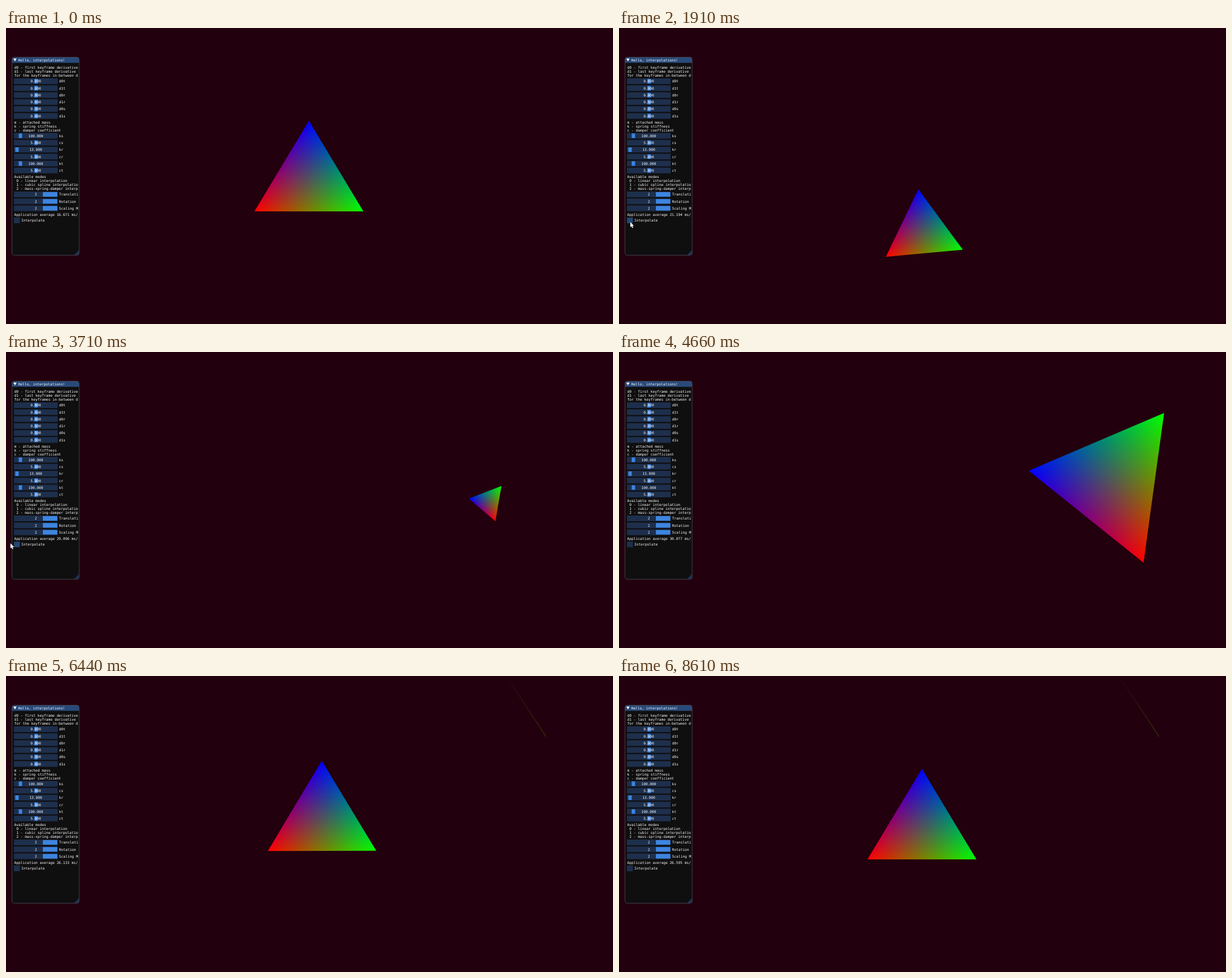
Recreate the animation shown at these times as an HTML page with a canvas. Size 1070 by 523 pixels, loop 8.64 s.

```html
<!DOCTYPE html>
<html lang="en">
<head>
<meta charset="utf-8">
<title>Interpolations</title>
<style>
html, body { margin: 0; height: 100%; overflow: hidden; background: #23000d; }
canvas { display: block; }
</style>
</head>
<body>
<canvas id="stage" width="1070" height="523"></canvas>
<script>
const ctx = document.getElementById('stage').getContext('2d');
const LOOP = 8640, CHECK = 1000, UNCHECK = 4100, RELEASE = 6130;
const HOME = [534, 244, 1, 0];

// time, centre x, centre y, scale, rotation in degrees
const poses = [
  [CHECK, ...HOME],
  [1330, 534, 105, 1.66, 0],
  [1910, 533, 341, .71, -5.3],
  [2130, 533, 455, .6, -9],
  [3710, 842, 263.5, .33, -80.3],
  [4660, 832.5, 225, 1.39, -82.2],
  [5060, 829, 125, 1.75, -30],
  [5390, 862, 38, 1.67, 15.4],
  [RELEASE, 861, 36, .93, -2.3]
];
const averages = [[0, 16.671], [1910, 21.191], [3710, 29.094], [4660, 30.077],
  [5390, 26.963], [6920, 26.025], [8610, 26.595]];

const mix = (a, b, u) => a.map((v, i) => v + (b[i] - v) * u);
const smooth = u => u * u * (3 - 2 * u);

// Monotone cubic through the keys, one value per column
function sample(keys, t) {
  const last = keys.length - 1;
  if (t <= keys[0][0]) return keys[0].slice(1);
  if (t >= keys[last][0]) return keys[last].slice(1);
  const i = keys.findIndex(k => k[0] > t) - 1;
  const [a, b] = [keys[i], keys[i + 1]];
  const span = b[0] - a[0], u = (t - a[0]) / span, v = 1 - u;
  const slope = (n, c) => (keys[n + 1][c] - keys[n][c]) / (keys[n + 1][0] - keys[n][0]);
  const tangent = (n, c) => {
    if (n === 0 || n === last) return 0;
    const p = slope(n - 1, c), q = slope(n, c);
    return p * q > 0 ? 2 * p * q / (p + q) : 0;
  };
  return mix(a, b, smooth(u)).slice(1).map((value, n) =>
    value + span * u * v * (v * tangent(i, n + 1) - u * tangent(i + 1, n + 1)));
}

// Follows the keys, then springs back home
function poseAt(t) {
  const pose = sample(poses, t);
  if (t < RELEASE) return pose;
  const s = (t - RELEASE) / 1000;
  return mix(HOME, pose, Math.exp(-4.9 * s) * Math.cos(4 * s));
}

function pointerAt(t) {
  const box = [20, 343];
  if (t < CHECK) return mix([820, 523], box, smooth((t - 20) / (CHECK - 20)));
  const out = Math.max(0, (t - 3530) / 270);
  return mix(box, [-7, 332], out * out);
}

function rect(x, y, w, h, color) {
  ctx.fillStyle = color;
  ctx.fillRect(x, y, w, h);
}

function polygon(points, fill) {
  ctx.beginPath();
  points.forEach(p => ctx.lineTo(...p));
  ctx.closePath();
  ctx.fillStyle = fill;
  ctx.fill();
}

function line(points, color, width) {
  ctx.beginPath();
  points.forEach(p => ctx.lineTo(...p));
  ctx.strokeStyle = color;
  ctx.lineWidth = width;
  ctx.stroke();
}

function text(s, x, middle, align = 'left') {
  ctx.textAlign = align;
  ctx.fillStyle = '#fff';
  ctx.fillText(s, x, middle + 2.3);
}

function lines(top, ...list) {
  list.forEach((s, i) => text(s, 14.5, top + i * 6.95));
}

// The grab sits at the given fraction of the slider's range
function slider(label, value, fraction, y, width = 6) {
  rect(14, y - 5, 77, 10, '#1d2f4c');
  rect(15.5 + (75 - width) * fraction, y - 4, width, 8, '#3d85e0');
  text(value, 52.5, y, 'center');
  text(label, 93.5, y);
}

function drawTriangle([x, y, scale, degrees]) {
  const corners = [[-96, 80], [96, 80], [0, -80]];
  ctx.save();
  ctx.translate(x, y);
  ctx.rotate(degrees * Math.PI / 180);
  ctx.scale(scale, scale);
  polygon(corners, '#000');
  ctx.globalCompositeOperation = 'lighter';
  // Each corner's colour fades to black at the opposite edge
  ['#f00', '#0f0', '#00f'].forEach((color, i) => {
    const p = corners[i], a = corners[(i + 1) % 3], b = corners[(i + 2) % 3];
    const ex = b[0] - a[0], ey = b[1] - a[1];
    const k = ((p[0] - a[0]) * ex + (p[1] - a[1]) * ey) / (ex * ex + ey * ey);
    const shade = ctx.createLinearGradient(...p, ...mix(a, b, k));
    shade.addColorStop(0, color);
    shade.addColorStop(1, '#000');
    polygon(corners, shade);
  });
  ctx.restore();
}

function drawTrace() {
  const ends = [[885, 5], [952, 107]];
  const fade = ctx.createLinearGradient(...ends.flat());
  fade.addColorStop(0, 'rgba(55,80,10,.1)');
  fade.addColorStop(1, 'rgba(55,80,10,1)');
  line(ends, fade, 1);
}

function drawPanel(t) {
  ctx.save();
  ctx.beginPath();
  ctx.roundRect(10.5, 51.5, 118.5, 350, 4);
  ctx.save();
  ctx.clip();
  rect(10, 51, 120, 351, '#100f10');
  rect(10, 51, 120, 10.5, '#294a7a');
  polygon([[129, 392], [129, 402], [119, 402]], '#1b3152');
  ctx.restore();
  ctx.beginPath();
  ctx.roundRect(10.5, 51.5, 118.5, 350, 4);
  ctx.strokeStyle = '#3f3f49';
  ctx.lineWidth = 1;
  ctx.stroke();

  ctx.font = '6.23px "DejaVu Sans Mono", monospace';
  ctx.textRendering = 'geometricPrecision';
  const pitch = 12.27;
  polygon([[13, 54], [18.6, 54], [15.8, 59]], '#fff');
  text('Hello, interpolations!', 21.5, 56.5);
  lines(69.6, 'd0 - first keyframe derivative', 'd1 - last keyframe derivative',
    'for the keyframes in-between d');
  ['d0t', 'd1t', 'd0r', 'd1r', 'd0s', 'd1s'].forEach((label, i) =>
    slider(label, '0.000', .5, 94 + i * pitch));
  lines(166.3, 'm - attached mass', 'k - spring stiffness', 'c - damper coefficient');
  ['s', 'r', 't'].forEach((axis, i) => {
    const y = 190.4 + 2 * i * pitch, stiffness = axis === 'r' ? 13 : 100;
    slider('k' + axis, stiffness.toFixed(3), stiffness / 1000, y);
    slider('c' + axis, '5.000', .5, y + pitch);
  });
  lines(262.6, 'Available modes', ' 0 - linear interpolation',
    ' 1 - cubic spline interpolatio', ' 2 - mass-spring-damper interp');
  ['Translati', 'Rotation', 'Scaling M'].forEach((label, i) =>
    slider(label, '2', 1, 294 + i * pitch, 25.5));
  lines(329.3, `Application average ${sample(averages, t)[0].toFixed(3)} ms/`);

  const checked = t >= CHECK && t < UNCHECK;
  rect(14, 335, 10.5, 10, checked ? '#23436f' : '#1d2f4c');
  if (checked) line([[16.5, 340], [18.5, 342.5], [22.3, 337.5]], '#2d5b96', 1);
  text('Interpolate', 27, 340);
  ctx.restore();
}

function drawPointer(x, y) {
  ctx.save();
  ctx.translate(x, y);
  polygon([[0, 0], [0, 9], [2.1, 7.2], [3.6, 10.4], [5, 9.8], [3.6, 6.6], [6.4, 6.4]], '#fff');
  ctx.restore();
}

function frame() {
  const t = performance.now() % LOOP;
  rect(0, 0, 1070, 523, '#23000d');
  if (t >= RELEASE) drawTrace();
  drawTriangle(poseAt(t));
  drawPanel(t);
  if (t >= 20 && t < 3800) drawPointer(...pointerAt(t));
  requestAnimationFrame(frame);
}
frame();
</script>
</body>
</html>
```
